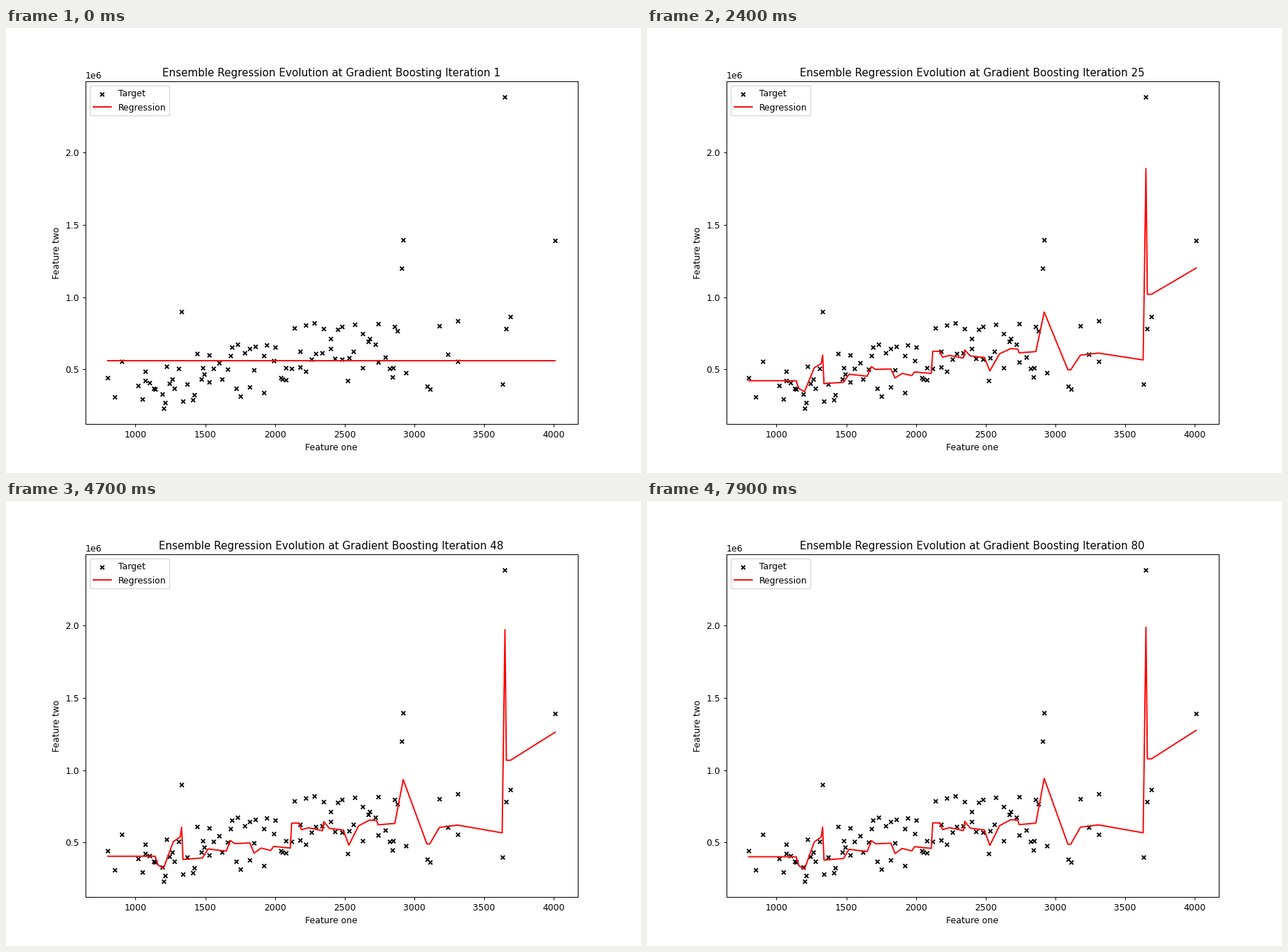
These frames come from a looping animation (894x626 px, 8 s). A matplotlib script:

```python
import numpy as np
import matplotlib.pyplot as plt
from matplotlib.animation import FuncAnimation

W, H, DPI = 894, 626, 89.4
STEPS = 80
MEAN = 560

# Outlying samples (x, y in thousands)
outliers = [(800, 440), (850, 308), (900, 555), (1200, 229.5), (1330, 900),
            (2910, 1200), (2920, 1398), (3090, 383), (3110, 365), (3180, 800),
            (3240, 603), (3310, 836), (3310, 554), (3630, 400), (3650, 2384),
            (3660, 783), (3690, 866), (4010, 1393)]

# Corners of the fitted curve (x, y in thousands)
corners = [(800, 400), (1140, 400), (1160, 338), (1200, 314), (1270, 503),
           (1320, 537), (1330, 605), (1340, 377), (1480, 388), (1520, 452),
           (1650, 436), (1680, 512), (1710, 490), (1820, 494), (1850, 422),
           (1900, 458), (1970, 441), (1990, 470), (2110, 458), (2120, 635),
           (2170, 635), (2190, 588), (2240, 602), (2340, 581), (2350, 645),
           (2390, 598), (2490, 586), (2530, 479), (2600, 616), (2680, 657),
           (2730, 653), (2740, 623), (2860, 633), (2920, 943), (3090, 487),
           (3110, 487), (3180, 605), (3310, 621), (3630, 566), (3650, 1990),
           (3660, 1079), (3690, 1079), (4010, 1276)]


def cloud(n=82):
    """Evenly spread samples in a band that rises with x."""
    rng = np.random.default_rng(7)
    x = np.linspace(1010, 2920, n) + rng.uniform(-20, 20, n)
    low = 240 + 0.1 * (x - 1000)
    high = np.minimum(830, 540 + 0.27 * (x - 1150))
    return np.column_stack([x.round(-1), rng.uniform(low, high)])


curve_x, goal = np.array(corners, float).T
gap = goal - MEAN
# Large residuals are learned faster
fast = 0.2 + 0.4 * np.abs(gap) / np.abs(gap).max()


def curve(n):
    left = fast * 0.75 ** n + (1 - fast) * 0.93 ** n
    return (MEAN + gap * (1 - left)) * 1e3


plt.rcParams["font.family"] = "DejaVu Sans"
fig, ax = plt.subplots(figsize=(W / DPI, H / DPI), dpi=DPI)
x, y = np.vstack([outliers, cloud()]).T
ax.scatter(x, y * 1e3, s=20, c="black", marker="x", label="Target")
line, = ax.plot(curve_x, curve(0), color="red", label="Regression")
ax.set_xlabel("Feature one")
ax.set_ylabel("Feature two")
ax.legend(loc="upper left")
title = ax.set_title("")


def update(i):
    line.set_ydata(curve(i))
    title.set_text(f"Ensemble Regression Evolution at Gradient Boosting Iteration {i + 1}")
    return line, title


anim = FuncAnimation(fig, update, frames=STEPS, interval=100, repeat=True,
                     repeat_delay=0)
plt.show()
```
